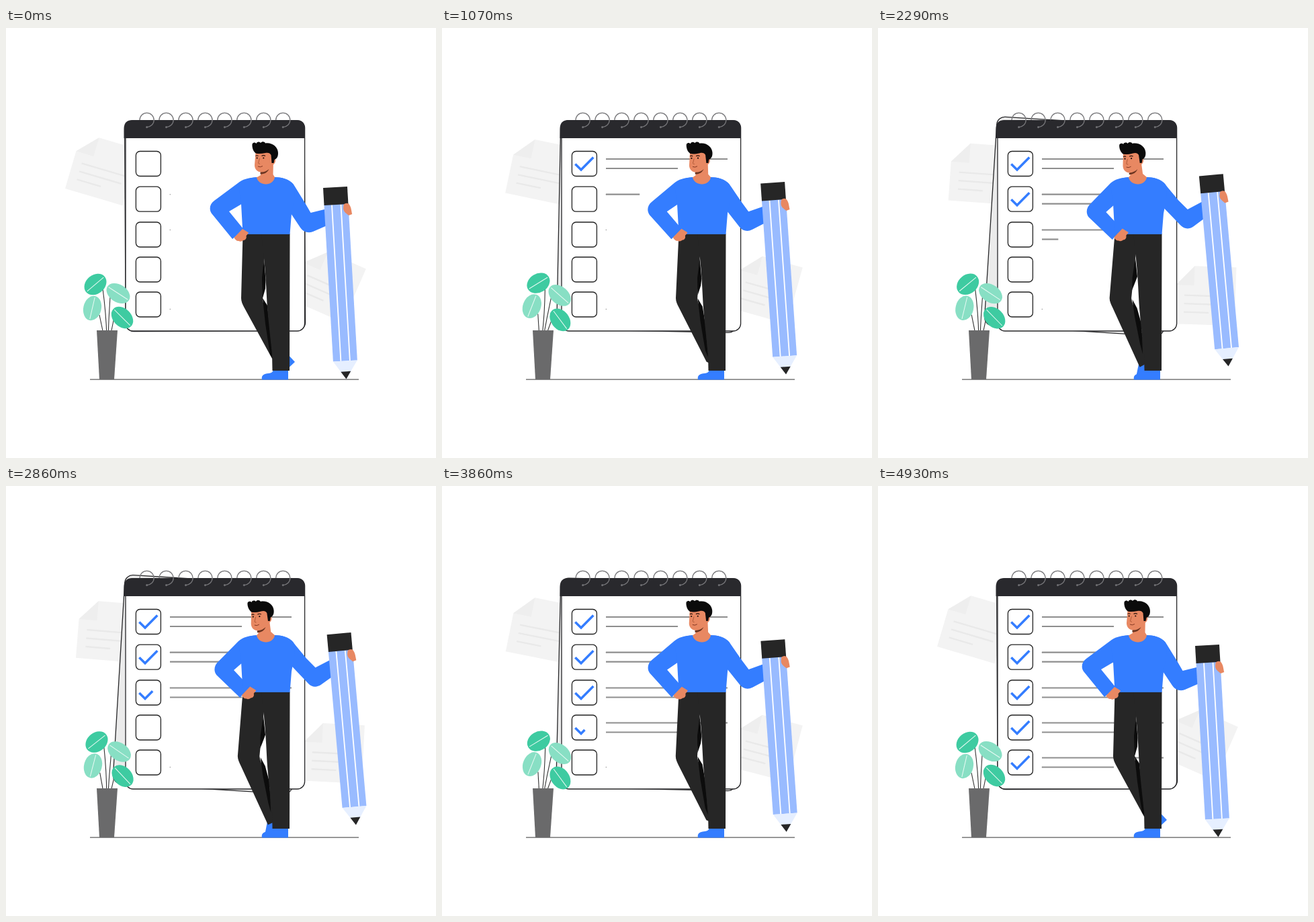
An HTML page that plays this animation: 640x640 px, repeating every 5 s.

```html
<!DOCTYPE html>
<html lang="en">
<head>
<meta charset="utf-8">
<title>Checklist</title>
<style>
html, body { margin: 0; width: 100%; height: 100%; overflow: hidden; background: #fff; }
svg { display: block; width: 100%; height: 100%; }
</style>
</head>
<body>
<svg viewBox="0 0 640 640" fill="none">
  <defs>
    <g id="sheet">
      <path fill="#f3f3f3" d="M0 0V-58L27 -87H89V0Z"/>
      <path fill="#eee" d="M0 -58L27 -87V-58Z"/>
      <path stroke="#e9e9e9" stroke-width="2.4" d="M13 -43H80M13 -30.5H78M13 -18H50"/>
    </g>
    <g id="ring" stroke="#77777a" stroke-width="1.3">
      <path d="M-10.6 0A10.6 10.6 0 0 1 10.6 0C10.6 6 6 10 .3 10.6"/>
      <circle cy="10.6" r="1.1" fill="#77777a" stroke-width=".8"/>
    </g>
  </defs>

  <use id="sheetL" href="#sheet"/>
  <use id="sheetR" href="#sheet"/>

  <rect id="back" x="176.6" y="140" width="267.4" height="311" rx="12" fill="#ebebeb" stroke="#262628" stroke-width="1.3"/>
  <rect x="178" y="138" width="266.6" height="313" rx="11" fill="#fff" stroke="#262628" stroke-width="1.3"/>
  <path fill="#29292d" d="M175.5 164V150Q175.5 137 188.5 137H432Q445 137 445 150V164Z"/>
  <g id="rings"></g>
  <g id="rows"></g>

  <path stroke="#8a8a8a" stroke-width="1.7" d="M125 523.2H525"/>

  <g id="plant"></g>
  <path fill="#6a6a6b" d="M135 450H166L161 523H139Z"/>

  <path id="backFoot" fill="#347dff"/>
  <path id="backLeg" fill="#262626"/>
  <path id="shadeTop" fill="#0c0c0c"/>
  <path id="shadeLow" fill="#0c0c0c"/>
  <path fill="#347dff" d="M381 523.5C379.500 517 384 514.500 391 514C395 513.500 397 512 398 509H420V523.500Z"/>
  <path fill="#262626" d="M380 306H422.500L422 510H396.500L396 485C393 455 389 425 388 400C387 380 386 362 384 343Z"/>

  <path id="armR" fill="#347dff"/>
  <path id="armL" fill="#347dff"/>
  <path fill="#347dff" d="M352 228C360 223.500 367 222.500 374 222H400C410 222 422 225 428 233L430 250L425 276L422.500 307H352.500L350 262L346 232Z"/>
  <path id="handL" fill="#e88862" d="M339.500 312L352 299L361 304.500C360 307.500 358 308 357.500 309.500C358.500 313 356.500 316 353 316C351 318 348 318 346.500 317C343.500 317.500 341 315 339.500 312Z"/>

  <path id="neck" fill="#e88862"/>
  <g id="head">
    <path fill="#e88862" d="M371.500 185L370 204C370 210 374 214.500 380 214.500C386 214.500 390 211 394 205C399 204 402 200 401 195L400 183Z"/>
    <path fill="#6b3521" d="M378.500 214.500C384 215 388 213 391.500 210C389 215 385 217.500 378.500 217.500Z"/>
    <path fill="#0b0b0b" d="M372 186.500C368 184 366 178 366.500 173C367 170 371 169.500 372.500 172C373 169 377.500 168.500 379 171C381 168.500 385 169 386 171.500C396 170 405 177 405 186C405 193 402 195 399.500 196L398.500 201H395.500L394.500 189C393 186 390 185 386 186C381 187 376 187.500 372 186.500Z"/>
    <g stroke="#2a120c">
      <path stroke-width="1.2" d="M371.500 190.500Q373.500 189 375.500 190.500M380.500 190.500Q383 188.800 386 190.500"/>
      <path stroke-width=".8" stroke="#a4502f" d="M377.500 194L375.500 201Q376 202.500 378 202"/>
      <path stroke-width=".9" stroke="#7a2f1c" d="M375 206Q378.500 207.800 382 205.500"/>
    </g>
    <circle cx="373.700" cy="193.500" r="1.100" fill="#1a0d0a"/>
    <circle cx="383.300" cy="193.500" r="1.100" fill="#1a0d0a"/>
  </g>

  <g id="pencil">
    <path fill="#99bbff" d="M0 25H36V259H0Z"/>
    <path stroke="#fff" stroke-width="1.800" d="M11.500 26V259M25 26V259"/>
    <path fill="#262626" d="M0 0H36V26H0Z"/>
    <path fill="#e6efff" d="M0 259H36L18 286Z"/>
    <path fill="#262626" d="M10.500 274.700H25.500L18 286Z"/>
  </g>
  <path id="handR" fill="#e88862" d="M502.500 263C505 260 509.500 260 511 263C514 267 514 272 515.200 277L510 279C507 276 502 274 502 268Z"/>
</svg>
<script>
const LOOP = 5000;
const $ = id => document.getElementById(id);
const lerp = (a, b, k) => a + (b - a) * k;
const clamp = x => Math.min(1, Math.max(0, x));

function add(parent, tag, attrs) {
  const el = document.createElementNS('http://www.w3.org/2000/svg', tag);
  for (const k in attrs) el.setAttribute(k, attrs[k]);
  return parent.appendChild(el);
}

// Blend two paths of the same structure
function blend(a, b, k) {
  const nums = b.match(/-?[\d.]+/g);
  let i = 0;
  return a.replace(/-?[\d.]+/g, n => lerp(+n, +nums[i++], k).toFixed(2));
}

// Eased there-and-back swing, 0 to 1 to 0
function swing(t, period) {
  const x = Math.pow(1 - Math.abs(1 - 2 * (t % period) / period), 1.06);
  return x * x * (3 - 2 * x);
}

const poses = {
  armL: [
    'M374 222C360 223 352 225 345 231L310 257C303 262 302 270 306 276L337 314L354 300L332 273L354 260Z',
    'M374 222C360 223 353 225 346 231L317 261C310 267 309 276 314 282L349 315L363 299L339.5 274L354 261Z'],
  armR: [
    'M400 222C416 223 425 227 430 236L446 262L453.5 275L478 269L480 293L457 303C449 306 442 303 438 297L420 270Z',
    'M400 222C416 223 424 227 431 237L447 256L461 270L483 258L486 283L470 295C463 300 456 299 451 294L420 262Z'],
  backLeg: [
    'M352.5 306L350 402C350 407 352 411 354 415L396 492L412 505L416 482L392 435C387 420 382 410 382 402L384 343L388 306Z',
    'M352.5 306L344.5 402C344.500 407 347 412 349 416L389.500 505L398 500L398 482L393 455C387 425 378 412 377 402L383 343L388 306Z'],
  shadeTop: [
    'M384 343L381 372L382 402L386 388L386.5 375Z',
    'M383 342L378.500 372L378 390L384 375L386 370Z'],
  shadeLow: [
    'M382 402L389 413L392 440L397 492L393 486L386 440Z',
    'M378.500 404L385.500 417L392 440L394 485L390 470L382 430Z'],
  backFoot: [
    'M412 484L422 488.5L430 497L421.500 505L410 508Z',
    'M388 498L398 501L400 510L392 517L384 517Z'],
  neck: [
    'M379 205L379 219L373 222.5C376 235.500 398 236 400 222L397.500 218L398 195Z',
    'M373 205L375.500 219L373 222.5C376 235.500 398 236 400 222L394 217L391 195Z']
};

for (let i = 0; i < 8; i++)
  add($('rings'), 'use', { href: '#ring', x: 209.6 + i * 28.95, y: 137 });

const ROWS = [
  // centre, lines start, tick start
  [202, 30, 700], [254.7, 960, 1735], [307.5, 1920, 2655], [359.5, 2930, 3715], [411.5, 3980, 4600]
];

const rows = ROWS.map(([y, start, tick], i) => {
  const g = $('rows');
  add(g, 'rect', { x: 193.4, y: y - 18.5, width: 37, height: 37, rx: 6, fill: '#fff', stroke: '#222', 'stroke-width': 1.3 });
  const dotY = { 1: y - 7, 2: y - 7, 4: y + 7 }[i];
  const dot = dotY && add(g, 'circle', { cx: 244.3, cy: dotY, r: 0.7, fill: '#8e8e8e' });
  const line = () => add(g, 'path', { stroke: '#8e8e8e', 'stroke-width': 2.2 });
  const mark = add(g, 'path', {
    d: `M198.3 ${y + 0.5}L207 ${y + 9}L225.3 ${y - 9.5}`, stroke: '#347dff', 'stroke-width': 3.5, pathLength: 1
  });
  return { y, start, tick, dot, mark, top: line(), low: line() };
});

// Stem path, then leaf centre, radii, tilt and colour
const LEAVES = [
  ['M150 460Q149 425 144 388', 133, 381.5, 18, 14, -40, '#3ecba1'],
  ['M152 460Q153 430 155 400', 167, 395, 19, 13, 33, '#88dfc4'],
  ['M146 460L139 427', 128.5, 417, 18.5, 13.3, -77, '#88dfc4'],
  ['M155 460L160.500 433', 173, 431, 18.5, 13.5, 45, '#3ecba1']
];
for (const [d] of LEAVES) add($('plant'), 'path', { d, stroke: '#333', 'stroke-width': 1.1 });
for (const [, x, y, rx, ry, tilt, fill] of LEAVES) {
  const g = add($('plant'), 'g', { transform: `translate(${x} ${y}) rotate(${tilt})` });
  add(g, 'ellipse', { rx, ry, fill });
  add(g, 'path', { d: `M${2 - rx} 0H${rx - 2}`, stroke: '#e9faf4', 'stroke-width': 1 });
}

function place(id, x, y, angle = 0, px = 0, py = 0) {
  $(id).setAttribute('transform', `translate(${x} ${y}) rotate(${angle} ${px} ${py})`);
}

function drawLine(el, y, len, k) {
  el.setAttribute('d', k > 0 ? `M244 ${y}h${len * k}` : '');
}

function render(t) {
  const s = swing(t, LOOP);
  for (const id in poses) $(id).setAttribute('d', blend(...poses[id], s));

  place('sheetL', lerp(88, 105, s), lerp(239, 257, s), lerp(16.4, 3.8, s));
  place('sheetR', lerp(419.4, 442, s), lerp(402.3, 441, s), lerp(23.7, 1.5, s));
  place('back', 0, 0, lerp(-0.3, 3.7, s), 310, 150);
  place('pencil', lerp(472, 478, s), lerp(238, 220, s), lerp(-3.3, -5.2, s));
  place('head', -4.7 * s, 0.3 * s, -3.5 * s, 388, 220);
  place('handL', 12 * s, -0.5 * s);
  place('handR', 6.5 * s, -19 * s);
  place('plant', 0, 0, 8.9 * swing(t, LOOP / 2), 151, 452);

  for (const r of rows) {
    const top = clamp((t - r.start) / 400);
    const low = clamp((t - r.start - 280) / 400);
    const k = clamp((t - r.tick) / 280);
    drawLine(r.top, r.y - 7, 181, top);
    drawLine(r.low, r.y + 7, 107, low);
    r.mark.setAttribute('stroke-dasharray', `${k} 2`);
    r.mark.setAttribute('visibility', k > 0 ? 'visible' : 'hidden');
  }
}

function tick() {
  render(performance.now() % LOOP);
  requestAnimationFrame(tick);
}
tick();
</script>
</body>
</html>
```
